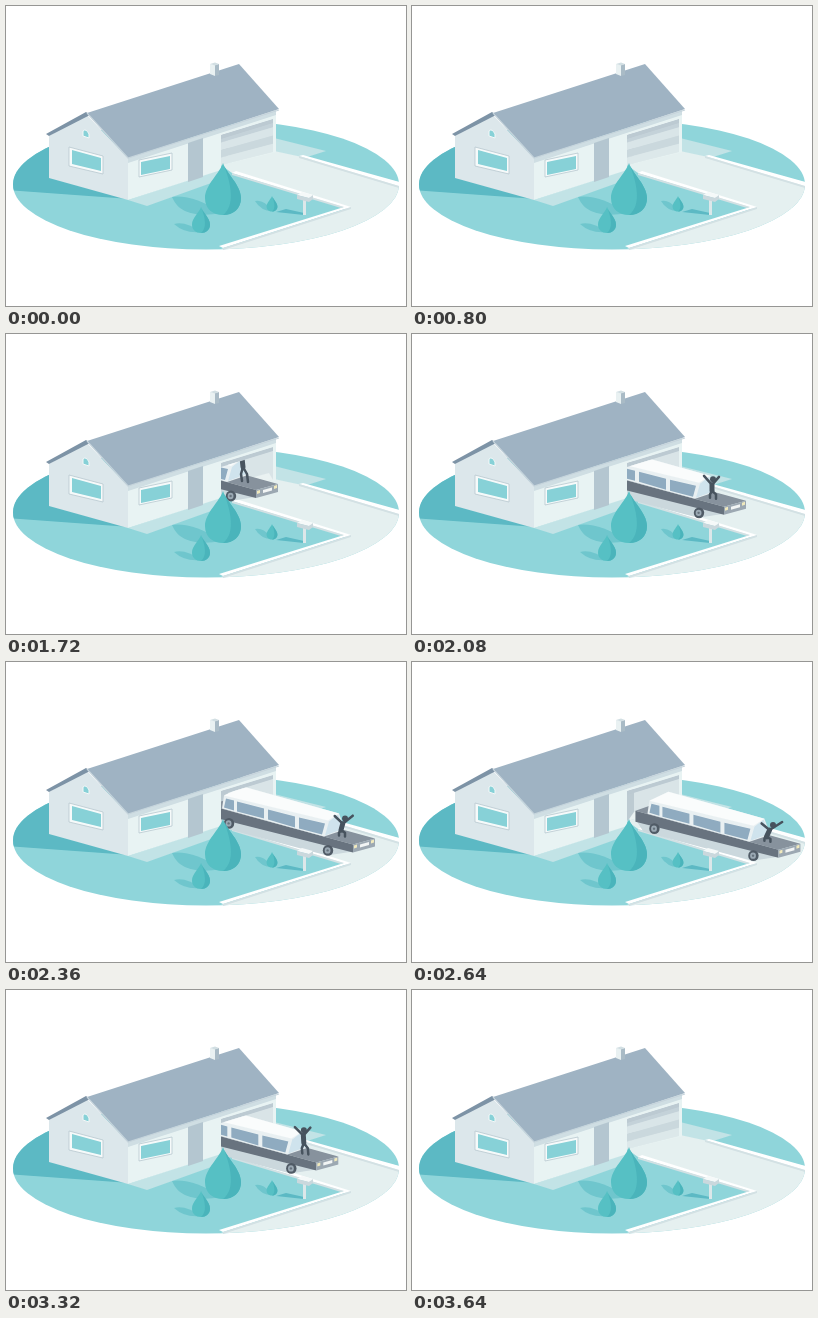
Animation of 400x300 px, one loop 5680 ms. Source, as an HTML page:

```html
<!DOCTYPE html>
<html lang="en">
<head>
<meta charset="utf-8">
<title>House and limousine</title>
<style>
html, body { margin: 0; width: 100%; height: 100%; overflow: hidden; background: #fff; }
svg { display: block; width: 100vw; height: 100vh; }
</style>
</head>
<body>
<svg viewBox="0 0 400 300">
  <defs>
    <clipPath id="lawn"><ellipse cx="200" cy="178.5" rx="193" ry="65"/></clipPath>
    <clipPath id="opening"><path d="M215 129L267 113V146L215 159Z"/></clipPath>
    <clipPath id="outside"><path d="M215 133L268 117H400V300H215Z"/></clipPath>
    <g id="tree">
      <path fill="#56c0c4" d="M0 0C3 10 18 22 18 35C18 46 10 52 0 52S-18 46-18 35C-18 22-3 10 0 0Z"/>
      <path fill="#4ab4bb" d="M0 0C3 10 18 22 18 35C18 46 10 52 0 52C12 43 9 22 0 0Z"/>
    </g>
    <g id="wheel">
      <ellipse rx="5.2" ry="5.4" fill="#505b66"/>
      <ellipse cx="-.4" rx="2.9" ry="3.2" fill="#9aa8b3"/>
      <circle cx="-.4" r="1.2" fill="#65717c"/>
    </g>
  </defs>

  <!-- ground -->
  <g clip-path="url(#lawn)">
    <rect width="400" height="300" fill="#8fd5da"/>
    <path fill="#5cb9c4" d="M0 184L124 193V100H0Z"/>
    <path fill="#c2e3e6" d="M122 194L215 163L222 171L141 200ZM268 132L320 145L298 152L262 146Z"/>
    <path fill="#e5f0f0" d="M215 159L268 145L296 151L400 178V260H215V243L341 203L226 167Z"/>
  </g>
  <g fill="#6fc6cd">
    <path d="M166 191Q186 188 216 207Q187 212 174 202Q169 198 166 191Z"/>
    <path d="M168 218Q180 215 195 226Q179 228 168 218Z"/>
    <path d="M249 195Q258 193 266 205Q255 205 249 195Z"/>
    <path fill="#5cb9c4" d="M270 206L280 203L298 207V209Z"/>
  </g>
  <path fill="#fff" d="M293 150L297 149L397 177L393 180ZM213 240L338 201L226 167L230 165L345 201L217 242Z"/>
  <path fill="#d3e1e4" d="M293 150L393 180V182L293 152ZM217 242L345 201V203L217 244ZM226 167L338 201L335 202L226 169Z"/>

  <!-- house -->
  <path fill="#dce7eb" d="M43 130L80 108L122 152V194L43 172Z"/>
  <path fill="#e8f3f3" d="M122 152L270 104V146L215 159V164L122 194Z"/>
  <path fill="#cfdee3" d="M122 152L270 104V109L122 157Z"/>
  <path fill="#f6fafa" d="M63 141L97 150V168L63 160ZM133 154L166 147V164L133 171Z"/>
  <path fill="#87d1d7" d="M66 144L95 152V165L66 158ZM135 156L164 150V163L135 169Z"/>
  <path fill="none" stroke="#b8c8d0" stroke-width=".8" d="M63 141L97 150V168L63 160ZM133 154L166 147V164L133 171Z"/>
  <path fill="#87d1d7" stroke="#f3f8f8" d="M77 125Q80 122 83 128V132L77 130Z"/>
  <path fill="#b4c6d0" d="M182 137L197 132V171L182 176Z"/>
  <g clip-path="url(#opening)">
    <rect x="214" y="110" width="55" height="52" fill="#d9e4e7"/>
    <path fill="#bdcbd2" d="M215 129L222 127V157L215 159Z"/>
    <path fill="#eaf2f2" d="M222 150L263 139L267 146L215 160Z"/>
    <g id="door"></g>
    <path fill="#bccad2" d="M215 129L267 113V117L215 133Z"/>
  </g>
  <path fill="#9fb3c3" d="M81 107L233 58L273 103L122 152Z"/>
  <path fill="#7d93a6" d="M40 128L80 106L84 109L43 130Z"/>
  <path fill="none" stroke="#c6d4dc" stroke-width="1.2" d="M81 107L122 152L273 104"/>
  <path fill="#e9f1f2" d="M204 58L209 59V70L204 68Z"/>
  <path fill="#a9bbc6" d="M209 59L213 58V69L209 70Z"/>
  <path fill="#d2dfe3" d="M204 58L209 56.5L213 58L209 59.5Z"/>

  <!-- limousine at the end of its drive -->
  <g clip-path="url(#outside)">
    <g id="car">
      <path fill="#cbd8dd" d="M233 161L375 197L349 201L240 172Z"/>
      <path fill="#87929d" d="M232 151L252 144L397 184L375 190Z"/>
      <path fill="#68737f" d="M232 151L375 190V198L232 162Z"/>
      <path fill="#e9f0f2" d="M246 141L265 132L361 159L367 175L346 182L244 154Z"/>
      <path fill="#fafcfc" d="M246 141L265 132L361 159L350 166Z"/>
      <path fill="#8fabc0" d="M248 144L256 146V156L246 153ZM259 147L286 154V164L259 157ZM290 155L317 162V173L290 165ZM321 163L347 169L344 180L321 174Z"/>
      <path fill="#cfe3ed" d="M351 167L360 160L366 174L347 181Z"/>
      <path fill="#9ca8b2" d="M375 190L397 184V192L375 198Z"/>
      <path fill="#f2f5f5" d="M382 190L391 187.5V190.5L382 193Z"/>
      <path fill="#f0e9bd" d="M376 191L379 190V193L376 194ZM393 186L396 185V188L393 189Z"/>
      <use href="#wheel" x="251" y="169"/>
      <use href="#wheel" x="350" y="196"/>
      <g stroke="#47535e" fill="none" stroke-linecap="round" stroke-linejoin="round">
        <path id="limbs" stroke-width="2.5"/>
        <path id="torso" stroke-width="5"/>
        <circle id="head" r="3" fill="#47535e" stroke="none"/>
      </g>
    </g>
  </g>

  <use href="#tree" transform="translate(217 157)"/>
  <use href="#tree" transform="translate(195 201) scale(.5)"/>
  <use href="#tree" transform="translate(266 190) scale(.3)"/>
  <path fill="#dce7e9" d="M297 192H300V209H297Z"/>
  <path fill="#f5f9f9" d="M291 189L296 186L307 189L303 192Z"/>
  <path fill="#cad8dd" d="M291 189L303 192V196L291 193ZM303 192L307 189V193L303 196Z"/>
</svg>
<script>
const LOOP = 5680, STEP = 40, SLOPE = 0.272;
const $ = id => document.getElementById(id);

// [time, value] keys
const drive = [[1240, -149], [1720, -125], [1960, -83], [2080, -63], [2360, -28],
  [2560, -13], [2840, -1], [3000, 0], [3160, -7], [3280, -45], [3400, -108], [3520, -149]];
const doorLift = [[800, 0], [1040, 17], [1280, 42], [3360, 42], [3500, 20], [3620, 0]];
const crouch = [[1720, 0], [2080, 1], [3000, 2], [3160, 2], [3400, 0]];

// Joints: hip, shoulder, head, left hand, right hand
const poses = [
  [[362, 167], [361, 158], [361, 153], [352, 150], [368, 150]],
  [[363, 174], [363, 168], [364, 162.5], [355, 159], [370, 160]],
  [[363, 178], [367, 171], [371, 166], [359, 165], [381, 163]]
];

const mix = (a, b, k) => a + (b - a) * k;

// Smooth monotone curve through the keys
function sample(keys, t) {
  const last = keys.length - 1;
  if (t <= keys[0][0]) return keys[0][1];
  if (t >= keys[last][0]) return keys[last][1];
  const i = keys.findIndex(key => key[0] > t) - 1;
  const slope = j => (keys[j + 1][1] - keys[j][1]) / (keys[j + 1][0] - keys[j][0]);
  const tangent = j => {
    if (j === 0 || j === last) return 0;
    const a = slope(j - 1), b = slope(j);
    return a * b > 0 ? 2 * a * b / (a + b) : 0;
  };
  const [t0, v0] = keys[i], [t1, v1] = keys[i + 1];
  const h = t1 - t0, u = (t - t0) / h, w = 1 - u;
  return w * w * (1 + 2 * u) * v0 + u * u * (3 - 2 * u) * v1
    + h * u * w * (w * tangent(i) - u * tangent(i + 1));
}

const panels = ["#c4d2d9", "#d9e5e8", "#cad8dd", "#dce8ea"];
$("door").innerHTML = panels.map((color, i) => {
  const left = 129 + i * 7.5, right = 113 + i * 8.25;
  return `<path fill="${color}" d="M215 ${left}L267 ${right}v8.5L215 ${left + 7.8}Z"/>`;
}).join("");

function drawRider(amount) {
  const i = Math.min(1, Math.floor(amount));
  const [hip, shoulder, head, left, right] = poses[i].map((joint, j) =>
    joint.map((value, axis) => mix(value, poses[i + 1][j][axis], amount - i)));
  const kneeY = (hip[1] + 181) / 2;
  $("limbs").setAttribute("d",
    `M361 181L${hip[0] - 2} ${kneeY}L${hip}L${hip[0] + 4} ${kneeY}L367 182M${left}L${shoulder}L${right}`);
  $("torso").setAttribute("d", `M${hip}L${shoulder}`);
  $("head").setAttribute("cx", head[0]);
  $("head").setAttribute("cy", head[1]);
}

function draw(now) {
  const t = Math.floor((now % LOOP) / STEP) * STEP;
  const x = sample(drive, t);
  $("car").setAttribute("transform", `translate(${x} ${x * SLOPE})`);
  $("car").style.display = t >= 800 && t < 3640 ? "" : "none";
  // The closed door hides whatever is parked behind its lower edge
  const lift = sample(doorLift, t);
  $("door").setAttribute("transform", `translate(0 ${-lift})`);
  const parked = lift < 42 && x < -140;
  $("outside").firstElementChild.setAttribute("d", parked
    ? `M215 ${Math.max(133, 159 - lift)}L268 ${Math.max(117, 146 - lift)}V146L215 159Z`
    : "M215 133L268 117H400V300H215Z");
  drawRider(sample(crouch, t));
  requestAnimationFrame(draw);
}
requestAnimationFrame(draw);
</script>
</body>
</html>
```
